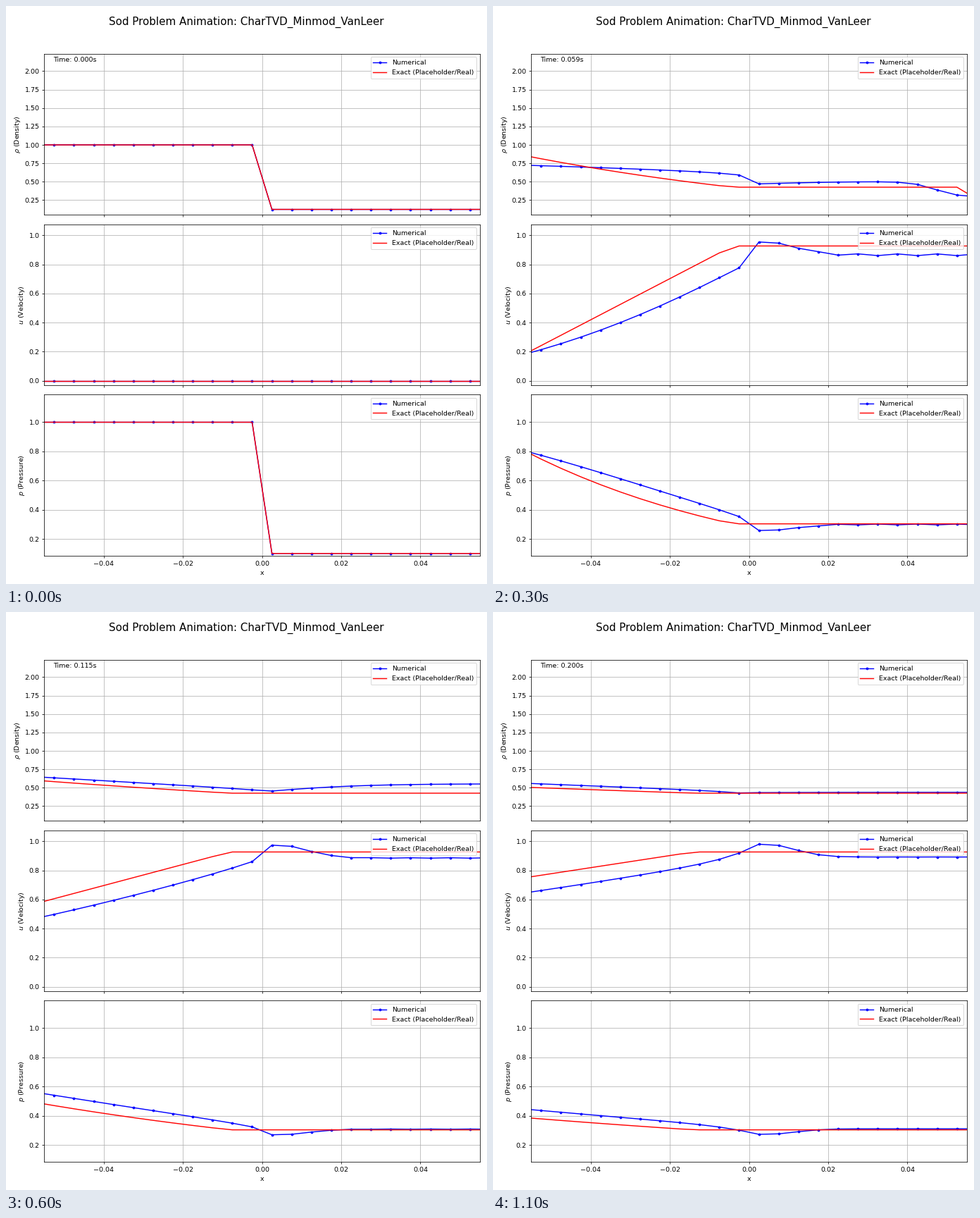
Animation of 683 by 820 pixels, one loop 1200 ms. Source, as a matplotlib script:

```python
import numpy as np
import matplotlib.pyplot as plt
from matplotlib.animation import FuncAnimation

W, H, DPI = 683, 820, 68.3
FRAMES, INTERVAL = 12, 100

cells = np.arange(24)
x = (cells - 11.5) * 0.005
C0 = np.sqrt(1.4)
U_STAR, RHO_STAR, SHOCK = 0.92745, 0.26557, 1.75216
RIGHT = 0.125, 0.0, 0.1


def time_at(frame):
    # Steps shorten at first, then settle until the end time
    return min(0.01868 * frame + 0.003 * (1 - np.exp(-0.8 * frame)), 0.2)


def isentropic(u):
    """Density and pressure inside a left-running rarefaction."""
    c = 1 - 0.2 * u / C0
    return c ** 5, c ** 7


def set_ahead(t, fields):
    for values, state in zip(fields, RIGHT):
        values[x > SHOCK * t] = state
    return fields


def exact(t):
    """Exact Riemann solution of the Sod tube, gamma = 1.4."""
    s = x / max(t, 1e-9)
    u = np.clip((C0 + s) / 1.2, 0, U_STAR)
    rho, p = isentropic(u)
    rho[s > U_STAR] = RHO_STAR
    return set_ahead(t, (rho, u, p))


def numerical(t):
    """Smeared fan, overshoot at the origin and a diffused contact."""
    t = max(t, 1e-9)
    fade = np.exp(-t / 0.04)
    inner = np.minimum(x, 0)

    # Velocity: parabolic fan on the left, plateau with a hump on the right
    fan = np.maximum(0.96 + (x - 0.006) / t / 2, 0) ** 2
    fan = np.maximum(fan + 0.5 * (t - 0.09) * np.exp(inner / 0.007), 0)
    hump = 0.09 * np.exp(-((x - 0.004) / 0.0072) ** 2 / 2)
    zigzag = 0.025 * fade * (-1.0) ** cells * (x > 0.015)
    plateau = 0.894 - 0.1 * np.exp(-t / 0.045)
    u = np.where(x < 0, fan, plateau + hump - zigzag)

    # Pressure: isentropic, with an early dip around the origin
    rho_fan, p = isentropic(u)
    dip = (0.008 + 0.12 * fade) * np.exp(inner / 0.008) * u
    p = p - dip

    # Density: flat at first on the left, relaxing to the fan
    level = min(0.36 * t ** -0.22, 1)
    blend = np.clip((t - 0.03) / 0.1, 0, 1)
    rho_left = level + blend * (rho_fan - level) - 2 * dip * (1 - blend)

    swell = 0.11 * np.exp(-((t - 0.11) / 0.05) ** 2)
    rho_right = 0.43 + 0.1 * np.exp(-t / 0.06) + swell * np.tanh(x / 0.025)
    behind = (1 - np.tanh((x - 0.8 * t) / 0.006)) / 2
    rho_right = 0.29 + (rho_right - 0.29) * behind
    return set_ahead(t, (np.where(x < 0, rho_left, rho_right), u, p))


fig = plt.figure(figsize=((W + 0.01) / DPI, (H + 0.01) / DPI), dpi=DPI)
fig.suptitle("Sod Problem Animation: CharTVD_Minmod_VanLeer", fontsize=16, y=0.9815)

PANELS = [(r"$\rho$ (Density)", (0.049, 2.237)),
          (r"$u$ (Velocity)", (-0.033, 1.0774)),
          (r"$p$ (Pressure)", (0.083, 1.1889))]
LEFT, TOP, WIDTH, HEIGHT, PITCH = 54.3, 67.7, 618.5, 228.8, 241.85

lines = []
for n, (label, ylim) in enumerate(PANELS):
    bottom = TOP + n * PITCH + HEIGHT
    ax = fig.add_axes([LEFT / W, 1 - bottom / H, WIDTH / W, HEIGHT / H])
    num, = ax.plot([], [], "b.-", label="Numerical")
    ref, = ax.plot([], [], "r-", label="Exact (Placeholder/Real)")
    lines.append((num, ref))
    ax.set(xlim=(-0.055, 0.055), ylim=ylim, ylabel=label)
    ax.set_xticks([-0.04, -0.02, 0, 0.02, 0.04])
    ax.tick_params(labelbottom=n == 2)
    ax.grid(True)
    ax.legend(loc="upper right")
    if n == 0:
        clock = ax.text(0.02, 0.95, "", transform=ax.transAxes)
ax.set_xlabel("x")


def draw(frame):
    t = time_at(frame)
    for (num, ref), approx, true in zip(lines, numerical(t), exact(t)):
        num.set_data(x, approx)
        ref.set_data(x, true)
    clock.set_text(f"Time: {t:.3f}s")
    return [clock, *(line for pair in lines for line in pair)]


anim = FuncAnimation(fig, draw, frames=FRAMES, interval=INTERVAL,
                     init_func=lambda: draw(0), repeat=True)
plt.show()
```
